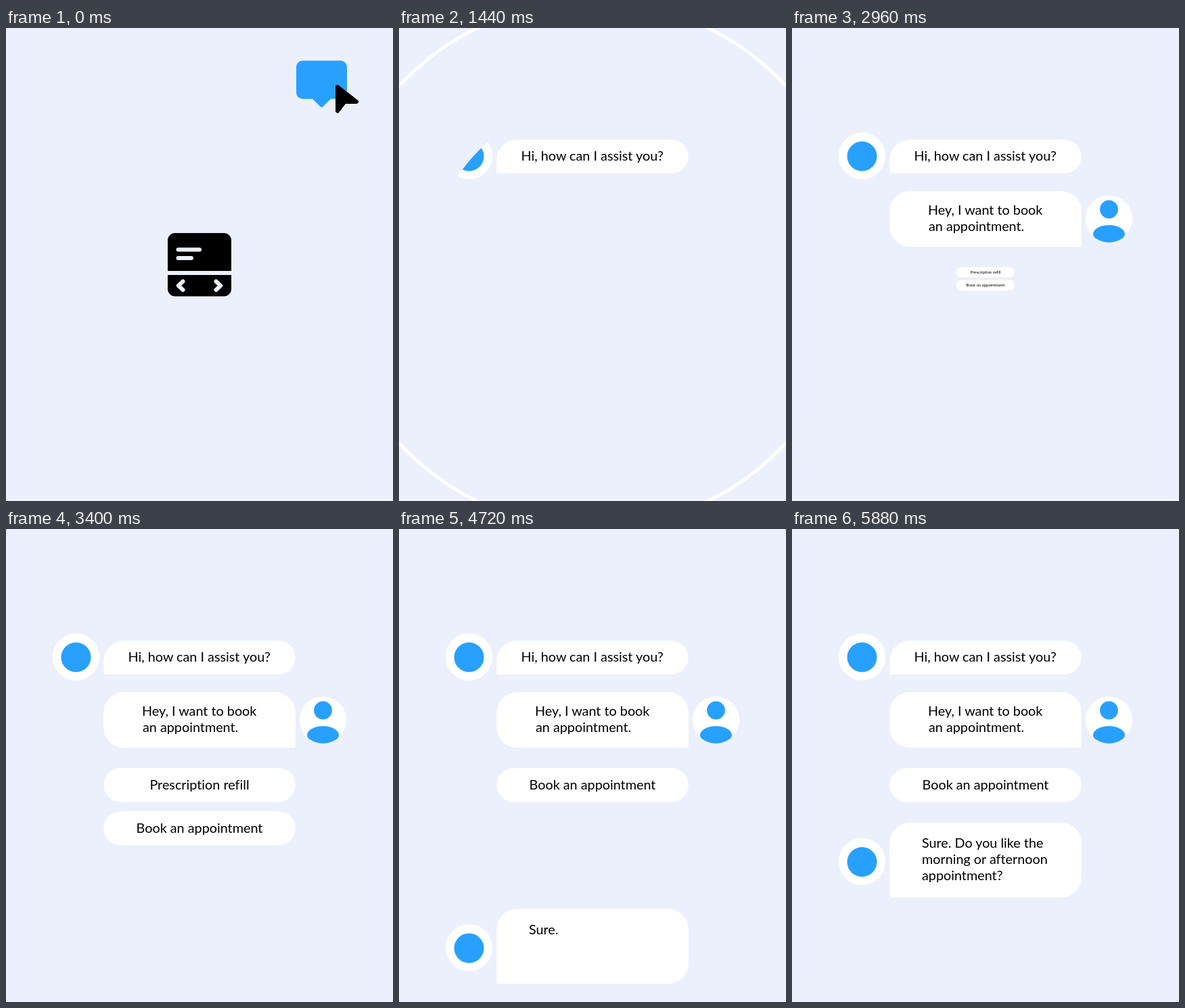
An HTML page for the animation above (6.72 s loop, 572 by 699 pixels).

```html
<!DOCTYPE html>
<html lang="en">
<head>
<meta charset="utf-8">
<title>Chat assistant</title>
<style>
  html, body { margin: 0; height: 100%; overflow: hidden; background: #ecf0fd; }
  svg { display: block; width: 100vw; height: 100vh; }
  text { font: 19.8px Lato, "Open Sans", sans-serif; font-variant-ligatures: none; fill: #000; white-space: pre; }
  .mid { text-anchor: middle; }
  .white { fill: #fff; }
  .blue { fill: #28a0ff; }
  .line { fill: none; stroke: #ecf0fd; stroke-width: 6; stroke-linecap: round; stroke-linejoin: round; }
</style>
</head>
<body>
<svg viewBox="0 0 572 699">
  <defs>
    <clipPath id="hole"><circle id="reveal" cx="286" cy="349.5" r="0"/></clipPath>
    <clipPath id="face"><circle cx="468.5" cy="282.2" r="34.8"/></clipPath>
    <g id="bot">
      <circle class="white" cx="103.5" cy="189" r="34.8"/>
      <circle class="blue" cx="103.5" cy="189.5" r="22"/>
    </g>
    <rect id="pill" class="white" x="144.3" y="353.3" width="283.5" height="50.3" rx="25.1"/>
  </defs>

  <g id="intro">
    <path d="M239 359V314a11 11 0 0 1 11-11H322a11 11 0 0 1 11 11V359ZM239 365H333V385.5a11 11 0 0 1-11 11H250a11 11 0 0 1-11-11Z"/>
    <path class="line" d="M254.5 327.5H286M254.5 340H274M261.5 374.5L254.8 380.7L261.5 387M310.5 374.5L317.2 380.7L310.5 387"/>
    <path id="bubble" class="blue" d="M9.5 0H65.5a9.5 9.5 0 0 1 9.5 9.5V47a9.5 9.5 0 0 1-9.5 9.5H51L39.6 67.8q-2.1 1.8-4.2 0L24 56.5H9.5a9.5 9.5 0 0 1-9.5-9.5V9.5a9.5 9.5 0 0 1 9.5-9.5Z"/>
    <path id="cursor" d="M490 87L518 109H500.5L490 122.7Z" stroke="#000" stroke-width="6" stroke-linejoin="round"/>
  </g>
  <circle id="ring" cx="286" cy="349.5" fill="#ecf0fd" stroke="#fff"/>

  <g clip-path="url(#hole)">
    <use href="#bot"/>
    <path class="white" d="M144.3 215V195a30 30 0 0 1 30-30H402.7a25 25 0 0 1 0 50Z"/>
    <text class="mid" x="285.7" y="196">Hi, how can I assist you?</text>

    <g id="user">
      <path class="white" d="M174.3 241H397.8a30 30 0 0 1 30 30V323.3H174.3a30 30 0 0 1-30-30V271a30 30 0 0 1 30-30Z"/>
      <text x="201" y="276.3">Hey, I want to book</text>
      <text x="202" y="300.3">an appointment.</text>
      <g clip-path="url(#face)">
        <circle class="white" cx="468.5" cy="282.2" r="35"/>
        <circle class="blue" cx="468.5" cy="268" r="13.4"/>
        <ellipse class="blue" cx="468.5" cy="304.5" rx="23.5" ry="13.2"/>
      </g>
    </g>

    <g id="options">
      <g id="refill">
        <use href="#pill"/>
        <text class="mid" x="286" y="384.7">Prescription refill</text>
      </g>
      <g id="book">
        <use href="#pill"/>
        <text class="mid" x="286" y="384.7">Book an appointment</text>
      </g>
    </g>

    <g id="reply">
      <use href="#bot" y="302.5"/>
      <path class="white" d="M144.3 544.5V464a30 30 0 0 1 30-30H397.8a30 30 0 0 1 30 30V514.5a30 30 0 0 1-30 30Z"/>
      <text x="192" y="471.3"></text>
      <text x="192" y="495.3"></text>
      <text x="192" y="519.3"></text>
    </g>
  </g>
</svg>
<script>
const LOOP = 6720, STEP = 40;
const $ = id => document.getElementById(id);
const part = (t, from, to) => Math.min(1, Math.max(0, (t - from) / (to - from)));
const easeOut = u => 1 - (1 - u) ** 3;
const easeInOut = u => (1 - Math.cos(Math.PI * u)) / 2;
const backOut = (u, k = 1.07) => 1 + (k + 1) * (u - 1) ** 3 + k * (u - 1) ** 2;
const move = (id, value) => $(id).setAttribute('transform', value);
const show = (id, on) => $(id).style.display = on ? '' : 'none';
const scaleAt = (x, y, s) => `translate(${x} ${y}) scale(${s}) translate(${-x} ${-y})`;

// Damped spring from 0 to 1
function spring(ms) {
  if (ms <= 0) return 0;
  if (ms >= 1260) return 1;
  return 1 - Math.exp(-0.00656 * ms) * Math.cos(Math.PI * ms / 200);
}

const lines = ['Sure. Do you like the', 'morning or afternoon', 'appointment?'];
const rows = $('reply').querySelectorAll('text');

function type(count) {
  lines.forEach((line, i) => {
    rows[i].textContent = line.slice(0, Math.max(0, count));
    count -= line.length + 1;
  });
}

function draw(t) {
  // Drag the chat bubble onto the page icon
  const m = easeInOut(part(t, 0, 680));
  move('bubble', `translate(${429 - 140 * m} ${48.3 + 246.7 * m}) scale(${1 - 0.08 * m})`);
  move('cursor', `translate(${-141 * m} ${243.5 * m})`);

  // Circular reveal of the chat
  const r = 389 * (Math.max(0, t - 700) / 740) ** 2;
  show('intro', r < 300);
  show('ring', r > 0 && r < 500);
  $('ring').setAttribute('r', r);
  $('ring').setAttribute('stroke-width', r / 78);
  $('reveal').setAttribute('r', r * 0.612);

  const s = spring(t - 1500);
  show('user', s > 0);
  move('user', scaleAt(503.5, 323.5, s));

  // Two options pop up, then the second takes the place of the first
  const slide = easeOut(part(t, 3880, 4560));
  show('options', t > 2920);
  move('options', scaleAt(286, 353.3, backOut(part(t, 2920, 3400))));
  move('book', `translate(0 ${64 * (1 - slide)})`);
  show('refill', slide < 1);

  show('reply', t > 4560);
  move('reply', `translate(0 ${285 * (1 - easeOut(part(t, 4560, 5240)))})`);
  type(Math.floor(55 * part(t, 4600, 5880)));
}

function tick(now) {
  draw(Math.floor(now % LOOP / STEP) * STEP);
  requestAnimationFrame(tick);
}
draw(0);
requestAnimationFrame(tick);
</script>
</body>
</html>
```
